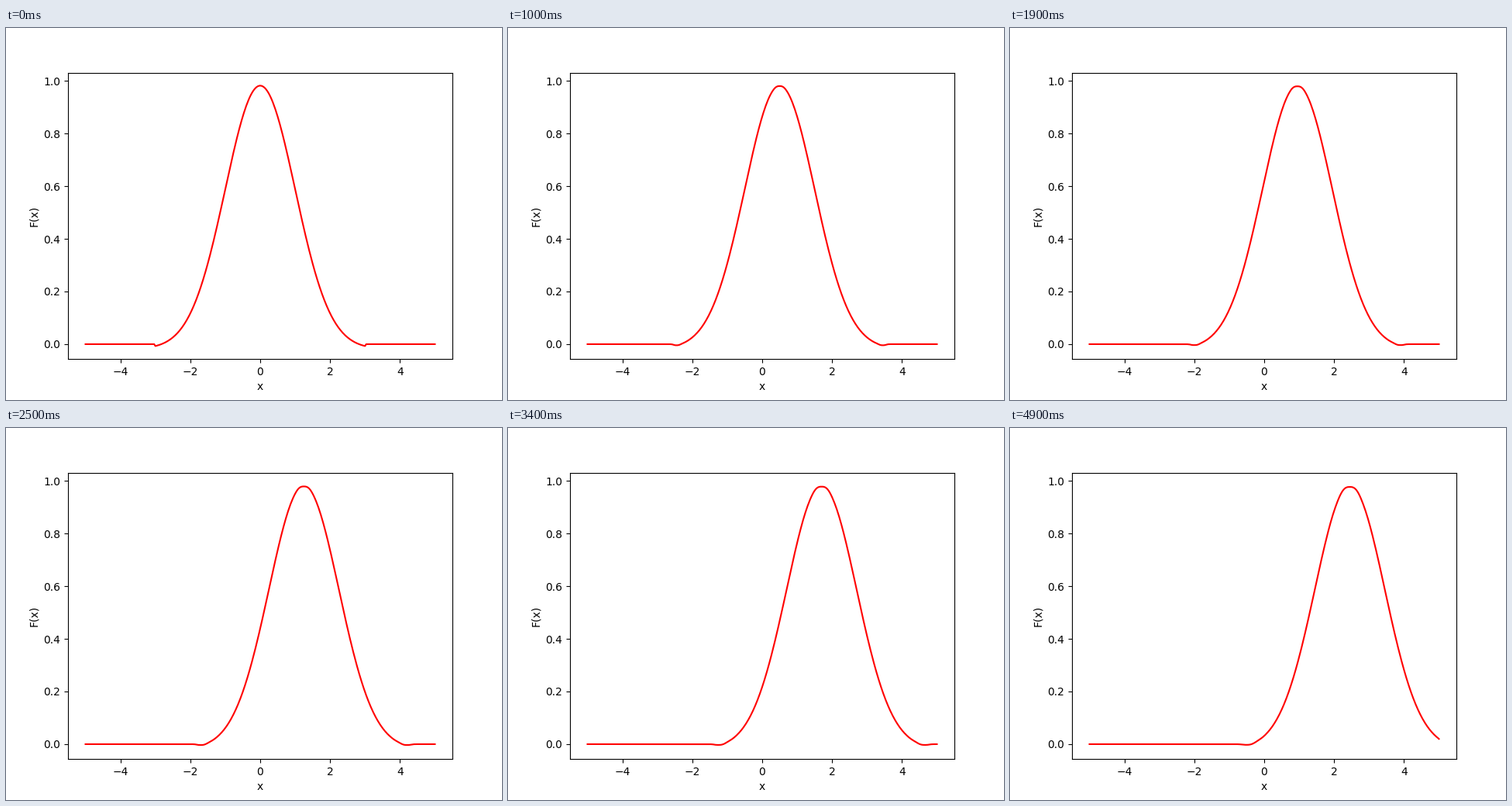
Recreate the animation shown at these times as a matplotlib script. Size 640 by 480 pixels, loop 5 s.

```python
import matplotlib.pyplot as plt
import numpy as np
from matplotlib.animation import FuncAnimation

FRAMES = 50
INTERVAL = 100      # ms
SHIFT = 0.05        # distance travelled per frame
COURANT = 0.5
CELLS = 300

x = np.linspace(-5, 5, CELLS + 1)
dx = x[1] - x[0]
steps_per_frame = round(SHIFT / (COURANT * dx))


def pulse(x):
    """Lowered Gaussian, cut off outside |x| <= 3."""
    return np.where(np.abs(x) < 3 + 1e-9, np.exp(-x**2 / 2) - np.exp(-4), 0.0)


def minmod(a, b):
    return np.where(a * b > 0, np.sign(a) * np.minimum(np.abs(a), np.abs(b)), 0.0)


def advect(u):
    """One step of limited second-order upwind transport to the right."""
    diff = np.diff(u, prepend=u[0], append=u[-1])
    slope = minmod(diff[:-1], diff[1:])
    flux = u + 0.5 * (1 - COURANT) * slope
    return u - COURANT * np.diff(flux, prepend=0.0)


def solve():
    u = pulse(x)
    states = [u]
    for _ in range(FRAMES - 1):
        for _ in range(steps_per_frame):
            u = advect(u)
        states.append(u)
    return states


states = solve()

fig, ax = plt.subplots(figsize=(6.4, 4.8), dpi=100)
line, = ax.plot(x, states[0], color="red", linewidth=1.5)
ax.set_xlabel("x")
ax.set_ylabel("F(x)")
ax.set_xlim(ax.get_xlim())
ax.set_ylim(ax.get_ylim())


def update(frame):
    line.set_ydata(states[frame])
    return line,


anim = FuncAnimation(fig, update, frames=FRAMES, interval=INTERVAL,
                     repeat=True, repeat_delay=0)
plt.show()
```
